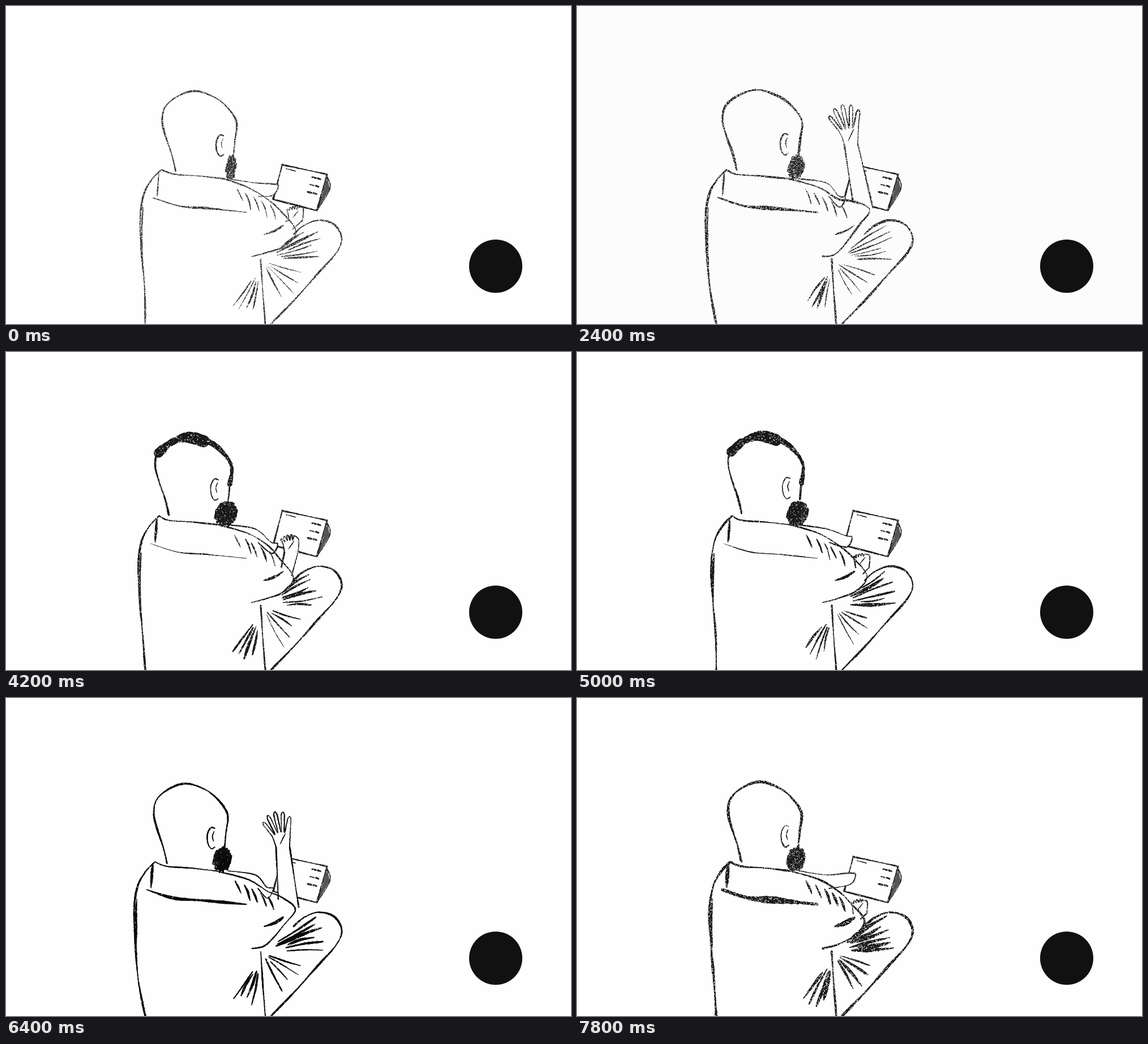
Animation, 998 px wide and 561 px high, one loop 8000 ms. Source, as an HTML page with a canvas:

```html
<!DOCTYPE html>
<html lang="en">
<head>
<meta charset="utf-8">
<title>Sketched reader</title>
<style>
html, body { margin: 0; width: 100%; height: 100%; overflow: hidden; background: #fefefe; }
canvas { display: block; width: 100%; height: 100%; }
</style>
</head>
<body>
<canvas id="stage" width="998" height="561"></canvas>
<script>
const STEP = 200, STEPS = 40;
const ctx = document.getElementById('stage').getContext('2d');

// "place" is tweened between poses; the drawing style switches with the nearest pose.
const poses = [
  { step: 0, paper: '#fefefe', ink: '#303030', line: 2.8, grain: .3, seam: 3.5, shade: 3,
    place: { head: [276, 150, 131], back: 237, cuff: [512, 397], wrist: [512, 378], open: 0, reach: [481, 317], beard: 8 } },
  { step: 7, paper: '#f8f8f8', ink: '#202020', line: 2.4, grain: .32, seam: 0, shade: 7,
    place: { head: [274, 151, 131], back: 233, cuff: [503, 388], wrist: [508, 352], open: .25, reach: [477, 342], beard: 12 } },
  { step: 12, paper: '#fcfcfc', ink: '#202020', line: 3.8, grain: .36, seam: 6, shade: 3,
    place: { head: [257, 148, 140], back: 227, cuff: [517, 360], wrist: [484, 243], open: 1, reach: [474, 338], beard: 13 } },
  { step: 17, paper: '#fafafa', ink: '#222', line: 3, grain: .42, seam: 0, shade: 2,
    place: { head: [260, 149, 137], back: 230, cuff: [503, 400], wrist: [504, 325], open: .25, reach: [474, 350], beard: 18 } },
  { step: 25, paper: '#fefefe', ink: '#1a1a1a', line: 3.2, grain: .12, seam: 2, shade: 4, hair: true,
    place: { head: [267, 144, 132], back: 237, cuff: [512, 395], wrist: [504, 380], open: 0, reach: [486, 327], beard: 18 } },
  { step: 32, paper: '#fefefe', ink: '#0c0c0c', line: 3.2, grain: .02, seam: 6, shade: 5,
    place: { head: [261, 151, 130], back: 226, cuff: [511, 372], wrist: [489, 263], open: .85, reach: [472, 336], beard: 15 } },
  { step: 39, paper: '#fefefe', ink: '#1a1a1a', line: 4.2, grain: .22, seam: 11, shade: 6,
    place: { head: [267, 148, 129], back: 234, cuff: [508, 393], wrist: [500, 380], open: 0, reach: [492, 312], beard: 15 } }
];
// Skull outline from nape to cheek, in fractions of the head's width and height.
const SKULL = [[.18, 1], [.13, .8], [.04, .55], [0, .37], [.04, .2], [.2, .07],
  [.42, 0], [.64, .05], [.84, .17], [1, .38], [.98, .62], [.96, .82]];
const SKULL_HEIGHT = 141;
const LEG = [[508, 403], [525, 388], [552, 378], [580, 386], [593, 410], [583, 436], [550, 473], [510, 518], [468, 561]];
const SHIN = [[450, 447], [452, 480], [454, 510], [458, 561]];
const TABLET = [[488, 280], [567, 297], [549, 361], [472, 341]];
const STAND = [[567, 300], [572, 323], [549, 361]];

let seed, paper, ink, grain;
function random() {
  seed = (seed * 1664525 + 1013904223) >>> 0;
  return seed / 4294967296;
}
const spread = size => (random() - .5) * size;
const mix = (a, b, u) => Array.isArray(a) ? a.map((v, i) => mix(v, b[i], u)) : a + (b - a) * u;
const polar = ([x, y], angle, r) => [x + Math.cos(angle) * r, y + Math.sin(angle) * r];

// Catmull-Rom curve sampled about every two pixels.
function curve(pts) {
  const out = [pts[0]];
  for (let i = 0; i + 1 < pts.length; i++) {
    const b = pts[i], c = pts[i + 1], a = pts[i - 1] || b, d = pts[i + 2] || c;
    const n = Math.max(2, Math.round(Math.hypot(c[0] - b[0], c[1] - b[1]) / 2));
    for (let j = 1; j <= n; j++) {
      const t = j / n;
      out.push(b.map((_, k) => {
        const slope = c[k] - a[k];
        const bend = 2 * a[k] - 5 * b[k] + 4 * c[k] - d[k];
        const twist = 3 * (b[k] - c[k]) + d[k] - a[k];
        return b[k] + t * (slope + t * (bend + t * twist)) / 2;
      }));
    }
  }
  return out;
}

function fill(pts, color) {
  ctx.fillStyle = color;
  ctx.beginPath();
  pts.forEach(p => ctx.lineTo(...p));
  ctx.fill();
}

// A rough line of uneven width, with specks of paper showing through.
function chalk(pts, width, tapered) {
  const line = curve(pts), phase = random() * 9;
  ctx.strokeStyle = ink;
  for (let i = 1; i < line.length; i++) {
    const taper = tapered ? .35 + .65 * Math.sin(Math.PI * i / line.length) : 1;
    ctx.lineWidth = Math.max(.7, width * taper * (.85 + .25 * Math.sin(i * .13 + phase) + spread(.3)));
    ctx.beginPath();
    ctx.moveTo(...line[i - 1]);
    ctx.lineTo(line[i][0] + spread(.8), line[i][1] + spread(.8));
    ctx.stroke();
  }
  ctx.fillStyle = paper;
  for (const [x, y] of line) {
    for (let k = width * grain * 1.3; k > random(); k--) {
      const size = .7 + random() * .9;
      ctx.fillRect(x + spread(width * 1.2), y + spread(width * 1.2), size, size);
    }
  }
}

function shape(pts, width) {
  fill(curve(pts), paper);
  chalk(pts, width);
}

function drawTablet() {
  fill(STAND, '#555');
  fill(TABLET, paper);
  chalk(STAND, 2);
  TABLET.forEach((p, i) => chalk([p, TABLET[(i + 1) % 4]], 2.8));
  chalk([[495, 287], [511, 291]], 2);
  for (let row = 0; row < 3; row++) {
    const x = 541 - row * 4, y = 302 + row * 13;
    chalk([[x, y], [x + 6, y + 1.5]], 3);
    chalk([[x + 10, y + 2], [x + 15, y + 4]], 3);
  }
}

function drawHand([x, y], open) {
  const outline = [[x - 12, y]], palm = 20 + 8 * open;
  for (let i = 0; i < 5; i++) {
    const angle = -Math.PI / 2 - .68 + .225 * i;
    const tip = palm + 4 + 34 * open - 2 * open * (i - 2) ** 2;
    outline.push(polar([x, y], angle - .11, palm), polar([x, y], angle - .04, tip),
      polar([x, y], angle + .05, tip));
  }
  outline.push([x + 13, y - palm], [x + 12, y]);
  shape(outline, 2);
  chalk([[x - 5, y - 5], [x + 5, y - palm + 2]], 1.5, true);
}

function drawArm({ wrist, cuff, open }) {
  const elbow = [cuff[0] - 12, cuff[1] - 10];
  const half = Math.min(18, 4 + Math.hypot(wrist[0] - elbow[0], wrist[1] - elbow[1]) / 7);
  const sides = [-1, 1].map(s => [[wrist[0] + s * 12, wrist[1]], [elbow[0] + s * half, elbow[1] + s * 7]]);
  fill([...sides[0], ...sides[1].slice().reverse()], paper);
  sides.forEach(side => chalk(side, 2.5));
  drawHand(wrist, open);
}

function drawHead([x, y, w], beard, hair, line) {
  const at = ([u, v]) => [x + u * w, y + v * SKULL_HEIGHT];
  const skull = SKULL.map(at);
  chalk(skull, line);
  if (hair) {
    chalk(skull.slice(4, 8).map(([a, b]) => [a, b + 4]), 18);
    chalk(skull.slice(7, 11), 8);
  }
  const [ex, ey] = at([.79, .68]);
  chalk([[ex + 5, ey - 17], [ex - 2, ey - 18], [ex - 8, ey - 6], [ex - 7, ey + 10], [ex - 1, ey + 19], [ex + 5, ey + 16]], 2.3);
  chalk([[ex + 4, ey - 12], [ex + 1, ey - 3], [ex + 3, ey + 6]], 1.8, true);
  const bx = x + w * .925;
  for (let dx = -beard; dx <= beard; dx += 2) {
    const h = 21 * Math.sqrt(1 - .9 * (dx / beard) ** 2);
    chalk([[bx + dx + 2, 285 - h + spread(4)], [bx + dx - 1, 285 + h + spread(5)]], 3);
  }
}

// Creases that radiate from one point between two angles.
function fan(center, from, to, count, near, far, width) {
  for (let i = 0; i < count; i++) {
    const angle = mix(from, to, i / (count - 1)) + spread(.06);
    const start = near + random() * near, end = far * (.75 + random() * .25);
    chalk([polar(center, angle, start), polar(center, angle + spread(.08), (start + end) / 2),
      polar(center, angle, end)], width * (.6 + random() * .8), true);
  }
}

function drawShirt({ head, back: b, cuff }, { line, seam, shade }) {
  const nape = head[0] + head[2] * .18, throat = [head[0] + head[2] * .84, 305];
  chalk([[b + 36, 290], [b + 20, 307], [b + 6, 334], [b, 378], [b + 3, 440], [b + 8, 500], [246, 561]], line);
  chalk([[b + 37, 289], [nape, 297], [nape + 42, 300], throat], line * .75);
  chalk([throat, [427, 320], [462, 341], [cuff[0] - 25, cuff[1] / 2 + 165], cuff,
    [cuff[0] - 18, cuff[1] + 26], [460, 435], [434, 442]], line * .75);
  chalk([[b + 33, 294], [b + 30, 335]], shade, true);
  chalk([[b + 5, 355], [b + 3, 390], [b + 4, 440]], shade, true);
  if (seam) chalk([[b + 22, 338], [b + 70, 353], [b + 120, 357], [425, 364]], seam, true);
  for (let i = 0; i < 5; i++) {
    const x = 406 + i * 15 + spread(6), y = 323 + i * 7;
    chalk([[x, y], [x + 6, y + 12], [x + 10, y + 20 + random() * 10]], shade * .7, true);
  }
  chalk([[456, 403], [474, 397], [490, 387]], shade * 1.2, true);
}

function drawLegs({ line, shade }) {
  fan([454, 447], -.6, -.03, 6, 24, 112, shade);
  fan([454, 451], .3, 1.1, 4, 10, 80, shade * .7);
  fan([450, 462], 1.75, 2.2, 4, 15, 88, shade);
  chalk(LEG, line);
  chalk(SHIN, line * .8);
}

function draw(step) {
  const next = Math.max(1, poses.findIndex(p => p.step >= step));
  const from = poses[next - 1], to = poses[next];
  const u = (step - from.step) / (to.step - from.step);
  const style = u < .5 ? from : to, place = {};
  for (const key in from.place) place[key] = mix(from.place[key], to.place[key], u * u * (3 - 2 * u));

  paper = style.paper;
  ctx.lineCap = 'round';
  ctx.fillStyle = paper;
  ctx.fillRect(0, 0, 998, 561);

  seed = 5;
  ink = '#222';
  grain = .1;
  drawTablet();
  ctx.fillStyle = '#111';
  ctx.beginPath();
  ctx.arc(865, 459, 47, 0, 7);
  ctx.fill();

  seed = 100 + step * 7919;
  ink = style.ink;
  grain = style.grain;
  const [rx, ry] = place.reach;
  shape([[392, 305], [440, 312], [rx - 12, ry - 3], [rx, ry], [rx - 10, ry + 17], [445, 336]], 2);
  drawArm(place);
  drawShirt(place, style);
  drawLegs(style);
  drawHead(place.head, place.beard, style.hair, style.line);
}

let shown = -1;
function tick() {
  const step = Math.floor(performance.now() / STEP) % STEPS;
  if (step !== shown) draw(shown = step);
  requestAnimationFrame(tick);
}
tick();
</script>
</body>
</html>
```
